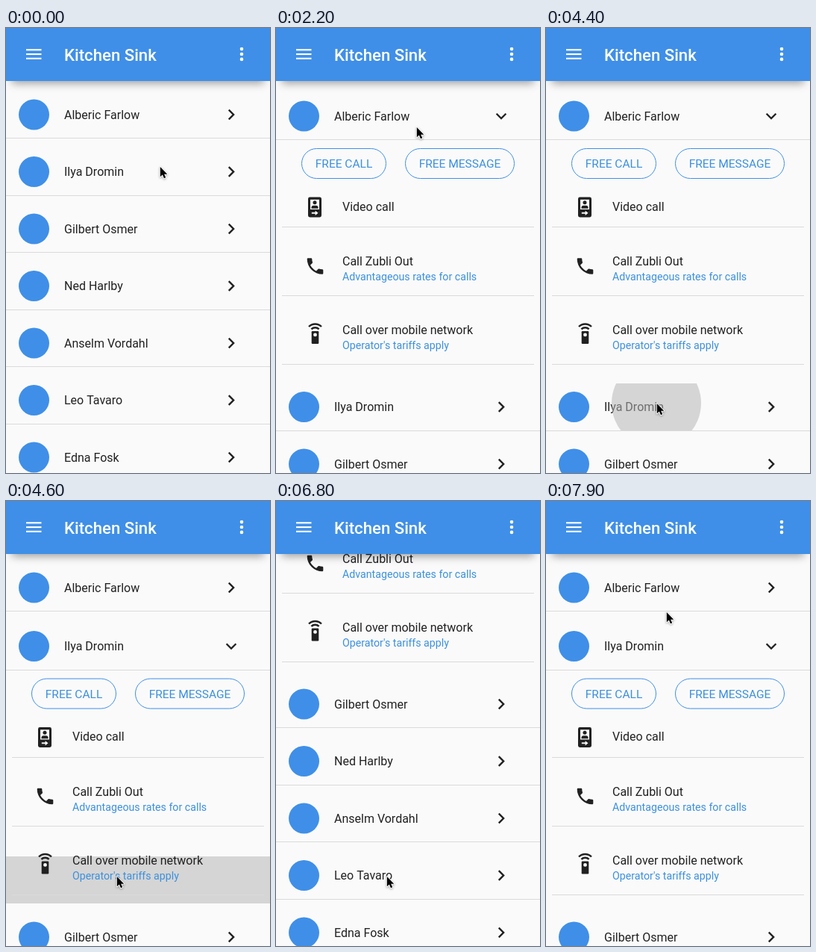
Recreate the animation shown at these times as an HTML page with a canvas. Size 354x596 px, loop 8 s.

```html
<!DOCTYPE html>
<html lang="en">
<head>
<meta charset="utf-8">
<title>Kitchen Sink</title>
<style>
  html, body { margin: 0; width: 100%; height: 100%; overflow: hidden; background: #fafafa; }
  canvas { display: block; }
</style>
</head>
<body>
<canvas id="stage" width="354" height="596"></canvas>
<script>
const ctx = document.getElementById('stage').getContext('2d');
const W = 354, H = 596, LOOP = 8000, STEP = 100;
const BLUE = '#3f8fe8', LINK = '#3c90de', INK = '#212121', PAPER = '#fafafa', RULE = '#dadada';
const FIRST_ROW = 116, PITCH = 76.5, EXTRA = 315, BAR = 71;

const NAMES = ['Alberic Farlow', 'Ilya Dromin', 'Gilbert Osmer', 'Ned Harlby',
  'Anselm Vordahl', 'Leo Tavaro', 'Edna Fosk'];

// time, x, y
const CURSOR = [[0, 206, 185], [500, 191, 119], [2100, 191, 119], [2800, 144, 362],
  [3000, 144, 362], [3500, 148, 502], [7500, 148, 502], [7900, 161, 148]];
// time, offset
const SCROLL = [[5600, 0], [5700, 66.5], [5800, 190], [5900, 285], [6000, 312],
  [6800, 312], [6900, 215], [7000, 70], [7100, 0]];
const PRESSES = [{ at: 1200, row: 0, x: 191, dy: 2 }, { at: 4400, row: 1, x: 148, dy: -5 }];
const OPEN_DELAY = 82.8, OPEN_TIME = 117, TURN_TIME = 150;

const clamp = v => Math.min(1, Math.max(0, v));
const linear = p => p;
const smooth = p => p * p * (3 - 2 * p);
const outCubic = p => 1 - (1 - p) ** 3;
const outSine = p => Math.sin(p * Math.PI / 2);

function track(keys, t, ease) {
  if (t <= keys[0][0]) return keys[0].slice(1);
  for (let i = 1; i < keys.length; i++) {
    const a = keys[i - 1], b = keys[i];
    if (t <= b[0]) {
      const p = ease((t - a[0]) / (b[0] - a[0]));
      return a.slice(1).map((v, k) => v + (b[k + 1] - v) * p);
    }
  }
  return keys[keys.length - 1].slice(1);
}

function text(str, x, y, size, color = INK, weight = 400, align = 'left') {
  ctx.font = `${weight} ${size}px Roboto, sans-serif`;
  ctx.textAlign = align;
  ctx.fillStyle = color;
  ctx.fillText(str, x, y);
}

function rect(x, y, w, h, color) {
  ctx.fillStyle = color;
  ctx.fillRect(x, y, w, h);
}

function disc(x, y, r, color) {
  ctx.fillStyle = color;
  ctx.beginPath();
  ctx.arc(x, y, r, 0, Math.PI * 2);
  ctx.fill();
}

function rounded(x, y, w, h, r) {
  ctx.beginPath();
  ctx.roundRect(x, y, w, h, r);
}

const rule = (y, x = 0, w = W) => rect(x, Math.round(y - 0.5), w, 1, RULE);

// Runs draw in a 24-unit icon grid centred on x, y.
function icon(x, y, draw, turn = 0) {
  ctx.save();
  ctx.translate(x, y);
  ctx.rotate(turn);
  ctx.scale(1.2, 1.2);
  ctx.translate(-12, -12);
  ctx.fillStyle = ctx.strokeStyle = INK;
  draw();
  ctx.restore();
}

const CHEVRON = new Path2D('M8.6 16.6L13.2 12L8.6 7.4L10 6L16 12L10 18Z');
const PHONE = new Path2D('M6.6 10.8C8.1 13.6 10.4 15.9 13.2 17.4L15.4 15.2C15.7 14.9 16.1 14.8 16.4 14.9' +
  'C17.6 15.3 18.8 15.5 20 15.5A1 1 0 0 1 21 16.5V20A1 1 0 0 1 20 21A17 17 0 0 1 3 4A1 1 0 0 1 4 3H7.5' +
  'A1 1 0 0 1 8.5 4C8.5 5.3 8.7 6.5 9.1 7.6C9.2 7.9 9.1 8.3 8.8 8.6Z');
const ARROW = new Path2D('M0 0V15.5L3.6 12.2L6 17.8L8.6 16.7L6.2 11.2H11Z');

function videoIcon() {
  rounded(4.5, 0.8, 15, 22.4, 2);
  ctx.fill();
  rect(7, 3.5, 10, 11, PAPER);
  disc(12, 6.8, 2.1, INK);
  rounded(8.2, 10.2, 7.6, 3.2, [2.5, 2.5, 0, 0]);
  ctx.fill();
  rect(8.5, 17.7, 4.5, 1.6, PAPER);
  ctx.fillStyle = PAPER;
  ctx.fill(new Path2D('M12.5 15.9L15.8 18.5L12.5 21.1Z'));
}

function remoteIcon() {
  ctx.lineWidth = 2;
  for (const r of [6, 10]) {
    ctx.beginPath();
    ctx.arc(12, 11, r, -Math.PI * 0.75, -Math.PI * 0.25);
    ctx.stroke();
  }
  rounded(8, 9, 8, 14, 1);
  ctx.fill();
  disc(12, 13, 2, PAPER);
}

function pill(label, x, y, w) {
  rounded(x + 0.5, y - 20, w - 1, 40, 20);
  ctx.strokeStyle = BLUE;
  ctx.lineWidth = 1;
  ctx.stroke();
  text(label, x + w / 2, y + 5.5, 15.5, LINK, 400, 'center');
}

function details(y) {
  pill('FREE CALL', 34, y + 65.5, 114);
  pill('FREE MESSAGE', 173, y + 65.5, 147);
  icon(52, y + 124, videoIcon);
  text('Video call', 89, y + 128.5, 16);
  icon(52.5, y + 203, () => ctx.fill(PHONE));
  text('Call Zubli Out', 89, y + 202.3, 16);
  text('Advantageous rates for calls', 89, y + 222.3, 14.2, LINK);
  icon(52.5, y + 293.7, remoteIcon);
  text('Call over mobile network', 89, y + 294.3, 16);
  text("Operator's tariffs apply", 89, y + 314.3, 14.2, LINK);
  for (const dy of [150.6, 242.6, 334.6]) rule(y + dy, 8, 338);
}

function item(name, y, turn) {
  disc(37.5, y, 20.5, BLUE);
  text(name, 78, y + 5.7, 16);
  icon(302, y, () => ctx.fill(CHEVRON), turn * Math.PI / 2);
  rule(y + 31.7);
}

function panelState(row, t) {
  const press = PRESSES[row];
  if (!press) return { grow: 0, turn: 0, open: false };
  const since = at => clamp((t - at - OPEN_DELAY) / OPEN_TIME);
  const turned = at => clamp((t - at) / TURN_TIME);
  const next = PRESSES[row + 1];
  const closing = next ? since(next.at) : 0;
  const opening = since(press.at);
  return {
    grow: outCubic(opening) * (1 - outSine(closing)),
    turn: turned(press.at) - (next ? turned(next.at) : 0),
    open: opening === 1 && closing === 0
  };
}

function ripple(press, y, t) {
  const age = t - press.at;
  if (age < 0 || age >= 700) return;
  const fade = (1 - clamp((age - 200) / 500)) ** 2;
  ctx.save();
  ctx.beginPath();
  ctx.rect(0, y - 31.5, W, 63);
  ctx.clip();
  disc(press.x, y + press.dy, 60 + age * 4, `rgba(180,180,180,${0.52 * fade})`);
  ctx.restore();
}

function list(t) {
  let y = FIRST_ROW - track(SCROLL, t, linear)[0];
  const panels = NAMES.map((name, row) => {
    const panel = { name, y, press: PRESSES[row], ...panelState(row, t) };
    panel.low = y + EXTRA * panel.grow;
    y = panel.low + PITCH;
    return panel;
  });
  for (const p of panels) if (p.press && p.open) ripple(p.press, p.low, t);
  for (const p of panels) {
    item(p.name, p.open ? p.y + 2 : p.low, p.turn);
    if (p.open) details(p.y);
    else if (p.press) ripple(p.press, p.low, t);
  }
}

function toolbar() {
  ctx.save();
  ctx.shadowColor = 'rgba(0,0,0,0.38)';
  ctx.shadowBlur = 11;
  ctx.shadowOffsetY = 3;
  rect(8, 30, W - 16, BAR - 30, BLUE);
  ctx.restore();
  rect(0, 0, W, BAR, BLUE);
  for (const dy of [-1, 0, 1]) {
    rect(27, 34 + dy * 5.8, 20.5, 2.1, '#fff');
    disc(316, 35 + dy * 6.9, 2.3, '#fff');
  }
  text('Kitchen Sink', 78, 44, 22.2, '#fff', 500);
}

function cursor(t) {
  const [x, y] = track(CURSOR, t, smooth);
  ctx.save();
  ctx.translate(Math.round(x) + 0.8, Math.round(y) + 1);
  ctx.scale(0.86, 0.86);
  ctx.lineJoin = 'round';
  ctx.lineWidth = 2;
  ctx.strokeStyle = '#fff';
  ctx.shadowColor = 'rgba(0,0,0,0.35)';
  ctx.shadowBlur = 3;
  ctx.shadowOffsetY = 1;
  ctx.stroke(ARROW);
  ctx.shadowColor = 'transparent';
  ctx.fillStyle = '#000';
  ctx.fill(ARROW);
  ctx.restore();
}

const start = performance.now();

function frame() {
  const elapsed = (performance.now() - start) % LOOP;
  const t = Math.floor(elapsed / STEP) * STEP;
  rect(0, 0, W, H, PAPER);
  list(t);
  toolbar();
  cursor(t);
  requestAnimationFrame(frame);
}
frame();
</script>
</body>
</html>
```
